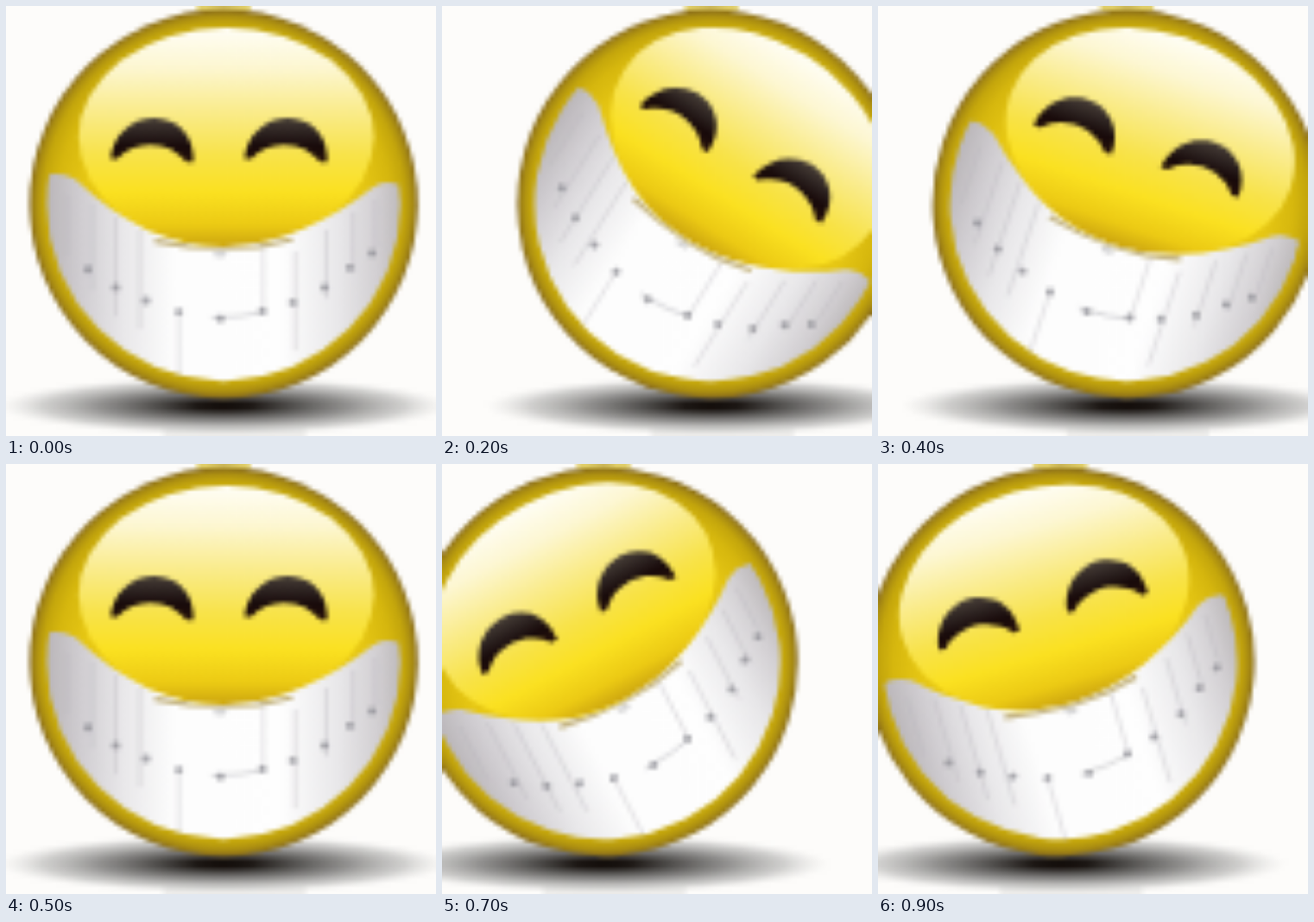
Animation of 498 by 498 pixels, one loop 1000 ms. Source, as an HTML page with a canvas:

```html
<!DOCTYPE html>
<html lang="en">
<head>
<meta charset="utf-8">
<title>Rocking grin</title>
<style>
html, body { margin: 0; width: 100%; height: 100%; overflow: hidden; background: #fdfcfa; }
canvas { display: block; width: 498px; height: 498px; }
</style>
</head>
<body>
<canvas id="stage" width="498" height="498"></canvas>
<script>
const SIZE = 498, GRID = 100, STEP = 100, R = 225, CY = 229;
// [centre x, tilt in degrees], one pose per step
const POSES = [
  [252, 0], [286, 17.6], [312, 32], [319, 36.8], [288, 18.5],
  [252, 0], [224, -12.3], [187, -27.6], [187, -27.6], [211, -16.3]
];

const out = document.getElementById('stage').getContext('2d');
const small = document.createElement('canvas');
small.width = small.height = GRID;
const c = small.getContext('2d');

function fade(g, stops) {
  stops.forEach(([at, color]) => g.addColorStop(at, color));
  return g;
}
const radial = (r, stops) => fade(c.createRadialGradient(0, 0, 0, 0, 0, r), stops);
const linear = (x0, y0, x1, y1, stops) => fade(c.createLinearGradient(x0, y0, x1, y1), stops);

function oval(x, y, rx, ry, fill) {
  c.beginPath();
  c.ellipse(x, y, rx, ry, 0, 0, Math.PI * 2);
  c.fillStyle = fill;
  c.fill();
}

function line(color, width, ...pts) {
  c.beginPath();
  pts.forEach(([x, y]) => c.lineTo(x, y));
  c.strokeStyle = color;
  c.lineWidth = width;
  c.stroke();
}

function shadow(x) {
  c.fillStyle = 'rgba(225,225,224,.7)';
  c.fillRect(x - 70, 490, 165, 7);
  c.save();
  c.translate(x, 463);
  c.scale(1, 0.128);
  oval(0, 0, 262, 262, radial(262, [
    [0, '#0c0603'], [0.14, '#1d1815'], [0.3, 'rgba(55,53,51,.88)'],
    [0.55, 'rgba(95,94,93,.68)'], [0.8, 'rgba(140,140,139,.4)'], [1, 'rgba(200,200,200,0)']
  ]));
  c.restore();
  oval(x, 2, 32, 5, '#dfcc66');
}

function ball() {
  oval(0, 0, R, R, radial(R, [
    [0, '#f4d91c'], [0.72, '#e6c714'], [0.86, '#d6b70e'],
    [0.93, '#c4a60c'], [0.97, '#a98c12'], [1, '#86691c']
  ]));
}

function gloss() {
  oval(3, -77, 171, 127, linear(0, -204, 0, 50, [
    [0, '#fffef6'], [0.18, '#fdf7d2'], [0.38, '#faec8c'], [0.58, '#f8e34a'],
    [0.75, '#fbe121'], [0.9, '#ecca14'], [1, '#cba40f']
  ]));
}

function mouth() {
  c.save();
  c.beginPath();
  c.moveTo(-206, -33);
  c.quadraticCurveTo(-190, -38, -172, -28);
  c.bezierCurveTo(-110, 28, -65, 49, 0, 50);
  c.bezierCurveTo(65, 49, 125, 20, 172, -18);
  c.quadraticCurveTo(186, -28, 204, -22);
  c.lineTo(230, 230);
  c.lineTo(-230, 230);
  c.closePath();
  c.clip();
  oval(0, 0, 205, 205, linear(-207, 0, 207, 0, [
    [0, '#b9b5b8'], [0.1, '#d0cdd1'], [0.22, '#e9e8ea'], [0.36, '#fdfdfd'],
    [0.66, '#fefefe'], [0.82, '#e9e8ea'], [0.93, '#d2cfd2'], [1, '#bcb8b9']
  ]));
  line('rgba(165,140,60,.6)', 6, [-80, 43], [-40, 49], [0, 51], [40, 49], [80, 41]);
  teeth();
  c.restore();
}

function teeth() {
  const seam = 'rgba(185,182,188,.5)';
  for (const [x, top, bottom] of [
    [-182, -10, 60], [-152, 0, 100], [-125, 15, 130], [-97, 30, 145],
    [-52, 126, 200], [46, 50, 126], [83, 55, 170], [119, 30, 110], [150, 10, 80], [176, -5, 50]
  ]) line(seam, 3, [x, top], [x, bottom]);
  line('rgba(160,160,165,.5)', 3, [-14, 132], [20, 130], [46, 125]);
  for (const [x, y] of [
    [-157, 76], [-125, 97], [-90, 112], [-52, 125], [-4, 133],
    [45, 124], [80, 114], [117, 97], [146, 74], [172, 57]
  ]) oval(x, y, 5, 4.5, 'rgba(140,140,147,.75)');
  oval(-4, 58, 8, 4, 'rgba(190,190,192,.6)');
}

function eye(x) {
  c.save();
  c.translate(x, -74);
  c.beginPath();
  c.moveTo(-48, 22);
  c.bezierCurveTo(-46, -4, -26, -25, 2, -26);
  c.bezierCurveTo(28, -26, 50, -6, 48, 26);
  c.lineTo(40, 26);
  c.bezierCurveTo(24, 4, -16, -4, -40, 22);
  c.closePath();
  c.fillStyle = linear(0, -26, 0, 26, [[0, '#494039'], [0.35, '#2c2220'], [0.65, '#180a0a'], [1, '#25100a']]);
  c.fill();
  c.restore();
}

function draw([x, tilt]) {
  c.setTransform(GRID / SIZE, 0, 0, GRID / SIZE, 0, 0);
  c.fillStyle = '#fdfcfa';
  c.fillRect(0, 0, SIZE, SIZE);
  shadow(x);
  c.translate(x, CY);
  c.rotate(tilt * Math.PI / 180);
  ball();
  gloss();
  mouth();
  eye(-83);
  eye(72);
  // enlarge the coarse picture for its soft, chunky edges
  out.imageSmoothingEnabled = true;
  out.drawImage(small, 0, 0, SIZE, SIZE);
}

const start = performance.now();
function tick() {
  const t = performance.now() - start;
  draw(POSES[Math.floor(t / STEP) % POSES.length]);
  requestAnimationFrame(tick);
}
tick();
</script>
</body>
</html>
```
